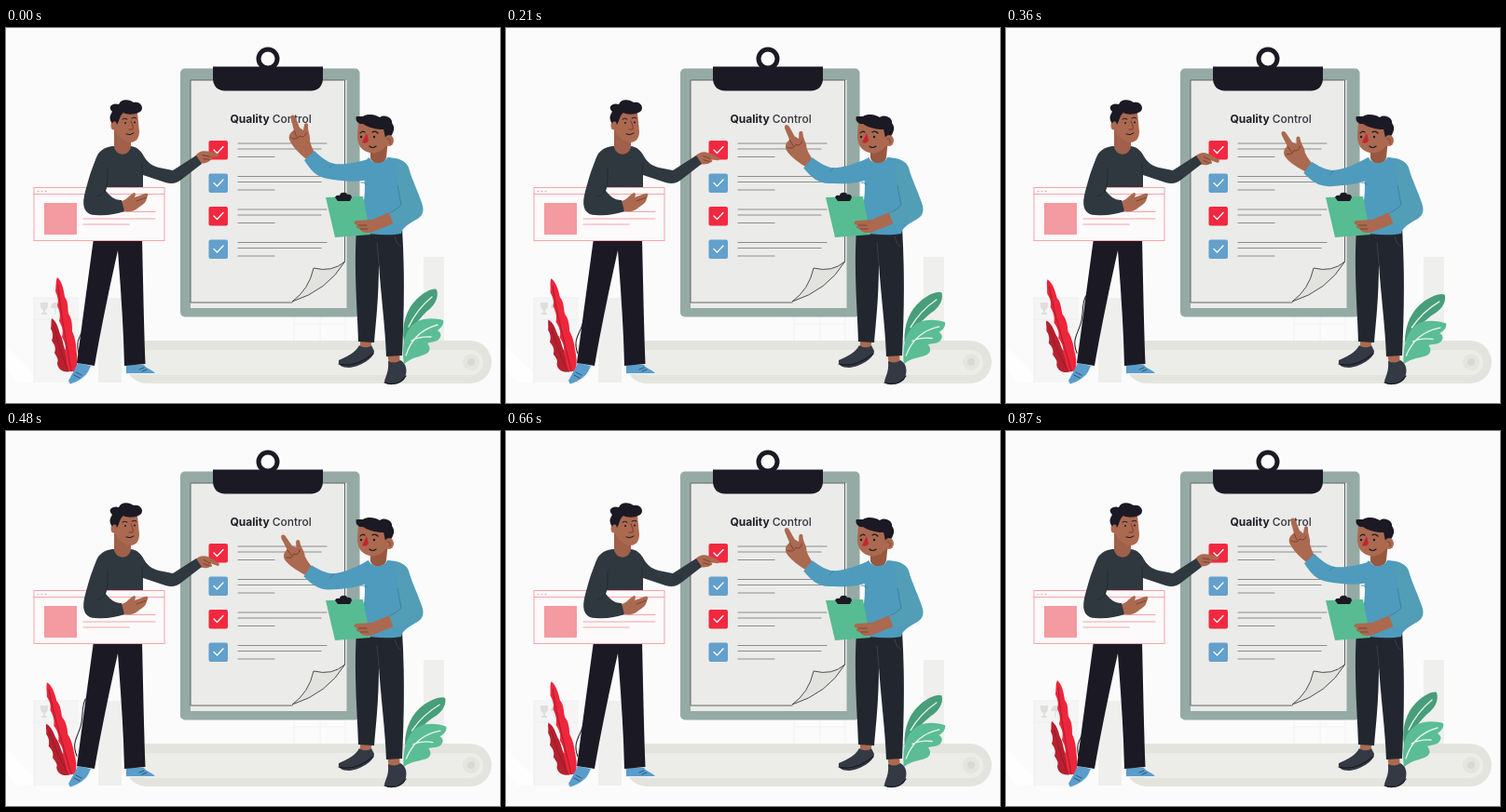
Write an HTML page that moves like this. It is 530x403 px and loops after 900 ms.

```html
<!DOCTYPE html>
<html lang="en">
<head>
<meta charset="utf-8">
<title>Quality Control</title>
<style>
html, body { margin: 0; width: 100%; height: 100%; overflow: hidden; background: #fbfbfb; }
svg { display: block; width: 100vw; height: 100vh; }
text { font: 500 12px Inter, "Open Sans", sans-serif; fill: #33323d; }
.bold { font-weight: 700; fill: #1f1e28; }
.line { fill: none; stroke-linecap: round; stroke-linejoin: round; }
.ink { stroke: #1b1a24; }
.skin { fill: #ab6950; }
.crease { stroke: #75402f; stroke-width: .9; }
.dark { fill: #1b1a24; }
.knit { fill: #30383f; }
.blue { fill: #4e9bbd; }
.shoe { fill: #343a44; }
</style>
</head>
<body>
<svg viewBox="0 0 530 403">
  <!-- backdrop -->
  <g id="backdrop">
    <path d="M0 341L30 372V381H12L0 366Z" fill="#fefefe"/>
    <rect x="30" y="290" width="48" height="91" fill="#f5f5f5"/>
    <path d="M30 290H78M30 313H78M30 290V381" class="line" stroke="#eeeeee"/>
    <rect x="99" y="290" width="25" height="91" fill="#efefee"/>
    <rect x="448" y="246" width="22" height="91" fill="#efefee"/>
    <path d="M309 310V336M337 310V336M364 310V336M309 318H364" class="line" stroke="#f2f2f1"/>
    <path d="M37 295H45V299Q44 303 42 303V306H44V308H38V306H40V303Q38 303 37 299Z" fill="#dededc"/>
    <path d="M48 301Q49 295 53 295Q57 295 58 301ZM52.500 301H53.500V308H52.500Z" fill="#dededc"/>
    <rect x="128" y="336" width="393" height="46" rx="23" fill="#e3e4de"/>
    <rect x="139" y="346" width="373" height="27" rx="13.500" fill="#ecece9"/>
    <circle cx="499" cy="359" r="9" fill="#e5e5e0"/>
    <circle cx="499" cy="359" r="4" fill="#d8d9d2"/>
  </g>

  <!-- large clipboard -->
  <rect x="187" y="43.500" width="192.500" height="267" rx="5" fill="#95aaa5"/>
  <path d="M198 56H365.500V301H198Z" fill="#ebebe9"/>
  <path d="M363.500 251V56H198V295H307" class="line" stroke="#606466"/>
  <path d="M307 294Q325 281 330 258Q350 263 363.500 251Q345 282 307 294Z" fill="#e2e2df" stroke="#4c4e52"/>
  <circle cx="281" cy="33" r="10" class="line ink" stroke-width="5"/>
  <path d="M222 41.500H340V55Q339 67 327 67.500H235Q223 67 222 55Z" class="dark"/>
  <text x="240.500" y="101.500" class="bold">Quality</text>
  <text x="285.700" y="101.500">Control</text>
  <g id="rows"></g>

  <!-- red plant -->
  <g id="plant">
    <path d="M78 350C74 336 80 331 85 320C90 309 88 299 94 290" class="line ink"/>
    <path d="M49 312C54 315 56 322 58 329C61 334 61 339 63 345C67 352 69 362 69 369C61 371 55 366 55 360C57 356 54 353 52 349C54 344 52 340 49 336C51 331 50 327 48 323C49 319 48 315 49 312Z" fill="#b6202f"/>
    <path d="M55 268C60 272 62 281 63 289C67 294 66 300 67 307C71 313 71 319 71 326C75 334 75 342 76 350C77 360 76 366 73 369H67C64 362 66 355 63 349C65 343 63 337 60 332C62 326 60 320 57 315C59 308 57 303 55 298C57 292 55 288 53 283C54 277 53 272 55 268Z" fill="#ed263b"/>
    <path d="M56 276C58 306 65 337 70 369M52 322C55 340 62 356 67 369" class="line" stroke="#911c2b" stroke-width=".8"/>
  </g>

  <!-- green leaves -->
  <g id="leafTop">
    <path d="M427 338C424 318 430 302 440 292C448 284 458 279 462 281C465 290 459 299 452 304C445 311 439 318 427 338Z" fill="#489e7a"/>
    <path d="M432 321Q441 302 457 289" class="line" stroke="#e2f2e9" stroke-width="1.400"/>
  </g>
  <g id="leafLow">
    <path d="M427 361C424 338 429 323 440 316C449 311 462 312 469 314C470 319 467 322 463 325C468 328 467 332 464 335C460 338 455 337 452 339C456 343 455 348 451 350C443 354 437 353 427 361Z" fill="#5bbd94"/>
    <path d="M429 352Q437 326 463 319M435 336Q444 331 456 332" class="line" stroke="#e8f5ee" stroke-width="1.300"/>
  </g>

  <!-- left presenter -->
  <g id="leftMan">
    <path d="M77 360L91 363L87 372C83 376 76 381 69 383L67 379L72 370Z" fill="#5a9dcc"/>
    <path d="M69 383Q83 379 89 369" class="line" stroke="#ecf2f6" stroke-width="1.200"/>
    <path d="M129 362L148 362C150 366 157 367 160 371H129Z" fill="#5a9dcc"/>
    <path d="M129 371.500H160" class="line" stroke="#ecf2f6" stroke-width="1.200"/>
    <path d="M73 373L79 376M75 370L81 373M143 367L148 365M146 369L151 367" class="line" stroke="#31536e"/>
    <path d="M94 226H146C147 270 148 320 149.500 361L127 363C126 320 123 280 120 239C111 279 102 322 95 363L76 360C82 315 88 270 94 226Z" class="dark"/>
    <g id="leftHand">
      <path d="M203 138C207 134 211 133 215 134L221 136L228 140C230 142 228 144 226 143L219 141C222 143 222 145 219 145C217 147 211 147 207 146Z" class="skin"/>
      <path d="M212 138L219 141M212 142L218 144" class="line crease"/>
    </g>
    <path d="M116 105V128C118 138 132 140 134 128V116Z" fill="#a1604a"/>
    <path d="M116 91H141L143 111C143 118 140 123 133 123C125 122 119 116 116 108Z" class="skin"/>
    <ellipse cx="116" cy="105" rx="3.500" ry="4.500" class="skin"/>
    <path d="M114 103C109 96 113 92 114 90C108 84 115 80 121 82C124 75 133 77 137 80C144 78 149 86 144 90C137 94 129 93 126 91C122 94 122 99 119 104L118 101C116 100 114 101 114 103Z" class="dark"/>
    <path d="M125 98Q127 96 130 98M135 97Q138 95 140 97M129 114Q133 116 137 113" class="line ink"/>
    <path d="M134 100Q137 106 136 109L132 109" class="line" stroke="#7c3a2e"/>
    <circle cx="128" cy="102" r="1" class="dark"/><circle cx="138" cy="101.500" r="1" class="dark"/>
    <path d="M116 127C118 138 132 139 134 127C141 128 145 132 148 138C152 145 157 148 164 150L179 153L204 137L210 146L188 163C183 167 178 168 171 166L147 158V178H99C87 178 92 147 99 135C104 129 110 127 116 127Z" class="knit"/>
    <path d="M146 146V157" class="line" stroke="#1e282e" stroke-width=".8"/>
    <rect x="30" y="171.500" width="140" height="57" fill="#fcfafa" stroke="#f5a3a9"/>
    <path d="M30 178.500H170M83 205H160M83 211H132M97 197.500H160" class="line" stroke="#f5a3a9"/>
    <path d="M34 175.500H35M38 175.500H39M42 175.500H43" class="line" stroke="#f3a3aa"/>
    <rect x="41" y="188" width="35" height="34" fill="#f49aa1"/>
    <path d="M124 186C128 185 130 183 133 180L137 177C140 177 139 180 138 182L149 178C153 177 153 180 151 182C151 188 146 190 141 194C136 198 130 198 125 196Z" class="skin"/>
    <path d="M140 186L151 182" class="line crease"/>
    <path d="M103 133C95 139 90 157 84 180C81 194 86 201 96 201C108 202 118 200 127 197L124 185C116 185 111 180 107 175C110 165 111 151 109 143Z" class="knit"/>
    <path d="M109 151Q110 166 106 176Q102 181 98 181" class="line" stroke="#1e282e" stroke-width=".8"/>
  </g>

  <!-- right presenter -->
  <g id="rightMan">
    <path d="M380 333H393L391 346H380ZM409 349H422L423 362H411Z" class="skin"/>
    <path d="M379 341C383 344 389 344 392 341L395 347C395 355 380 364 368 365C360 365 356 362 357 357C366 353 375 349 379 341Z" class="shoe"/>
    <path d="M410 358C414 360 420 360 423 357C429 360 432 368 427 378C421 384 408 385 406 380C407 374 411 370 410 358Z" class="shoe"/>
    <path d="M357 361Q374 366 394 350M406 381Q421 386 429 374" class="line" stroke="#171a22" stroke-width="1.200"/>
    <path d="M376 215H425C428 262 427 310 425 352L408 353C407 322 402 285 400 253C400 288 397 315 395 338L378 337C377 302 373 263 376 215Z" fill="#22272f"/>
    <path d="M400 253L398 231M417 224Q419 233 424 235" class="line" stroke="#414650" stroke-width=".8"/>
    <path d="M391 125V140C394 148 406 148 408 139L410 120Z" fill="#98583f"/>
    <path d="M378 100H410V123C406 131 398 136 390 134C381 132 377 125 377 116Z" class="skin"/>
    <path d="M376 95C379 95 381 95 383 95C389 91 398 94 401 96C407 92 415 97 414 102C418 107 416 112 412 118H407C406 114 406 112 405 109C397 109 389 107 383 103C378 104 374 99 376 95Z" class="dark"/>
    <ellipse cx="411" cy="121" rx="5" ry="6" class="skin"/>
    <path d="M380 113Q382 110 385 112M393 112Q396 110 399 113M390 127Q393 130 397 127" class="line ink" stroke-width="1.200"/>
    <path d="M387 113L389 121Q387 125 382 123Z" fill="#c32530"/>
    <path d="M409 119Q413 118 412 124" class="line crease"/>
    <circle cx="381" cy="117" r="1.200" class="dark"/><circle cx="395" cy="117" r="1.200" class="dark"/>
    <g id="rightArm">
      <path d="M321 140C313 133 307 127 304 120C303 115 305 112 309 110L305.500 97C305 93 309 92 310.500 96L315 107L319 110L320 104C321 101 325 102 324 106C324 112 327 116 326 121C327 126 329 130 331 134L325 143Z" class="skin"/>
      <path d="M309 110L312 117M306 118Q312 121 315 116Q320 119 322 113" class="line crease"/>
      <path d="M320 142L331 132C337 138 344 144 352 146C364 147 376 145 391 140L396 160C379 168 359 164 345 162C333 160 327 153 320 142Z" class="blue"/>
      <path d="M352 146L347 150" class="line" stroke="#367c9e" stroke-width=".8"/>
    </g>
    <path d="M389 139C393 147 405 147 409 139C419 140 426 140 431 149L438 207C430 212 425 215 424 221C408 224 390 221 376 219C380 205 385 190 385 170C384 156 384 143 389 139Z" class="blue"/>
    <path d="M387 168Q383 165 381 166" class="line" stroke="#367c9e" stroke-width=".8"/>
    <path d="M343 182L383 181L391 222L353 225Z" fill="#57bc91"/>
    <path d="M353 182Q354 179 358 180C358 176 366 176 366 179Q370 178 371 182L369 186H356Z" class="dark"/>
    <path d="M412 198C402 202 399 203 393 206L376 207C372 208 373 212 378 212C374 213 376 216 380 216C381 221 390 221 396 218L416 210Z" class="skin"/>
    <path d="M378 212H387M380 216H388" class="line crease"/>
    <path d="M418 142C424 142 429 143 432 150C435 162 444 180 447 191C449 199 445 204 438 207L416 212L411 199C417 197 422 194 424 190L419 166Z" fill="#519eb6"/>
    <path d="M420 169L424 190Q420 195 413 198" class="line" stroke="#367c9e" stroke-width=".8"/>
  </g>
</svg>
<script>
const LOOP = 900, STEP = 30;
const el = id => document.getElementById(id);

el("rows").innerHTML = [121, 156.5, 192, 227.5].map((y, i) => `
  <rect x="217.500" y="${y}" width="20.500" height="20.500" rx="2" fill="${i % 2 ? "#63a0cb" : "#f2283f"}"/>
  <path d="M223 ${y + 10}l3.500 3.500 6.500-7" class="line" stroke="#fff" stroke-width="1.300"/>
  <path d="M249 ${y + 3}H344M249 ${y + 9}H338M249 ${y + 17.5}H288" class="line" stroke="#8b8d8d" stroke-width="1.200"/>`).join("");

const joints = [
  // id, start angle, swing, pivot x, pivot y
  ["rightArm", 0, -12.8, 385, 152],
  ["leftHand", -13, 18, 206, 142],
  ["plant", 0, -6.4, 70, 368],
  ["leafTop", 0, 9, 427, 344],
  ["leafLow", 0, 5, 427, 356]
].map(([id, from, swing, x, y]) => ({ node: el(id), from, swing, x, y }));

function draw(ms) {
  const t = Math.floor((ms % LOOP) / STEP) * STEP;
  const s = Math.sin(Math.PI * t / (LOOP - STEP));
  const sway = (s + s * s) / 2;
  for (const j of joints) {
    j.node.setAttribute("transform", `rotate(${j.from + j.swing * sway} ${j.x} ${j.y})`);
  }
}

let start;
function tick(now) {
  start ??= now;
  draw(now - start);
  requestAnimationFrame(tick);
}
draw(0);
requestAnimationFrame(tick);
</script>
</body>
</html>
```
